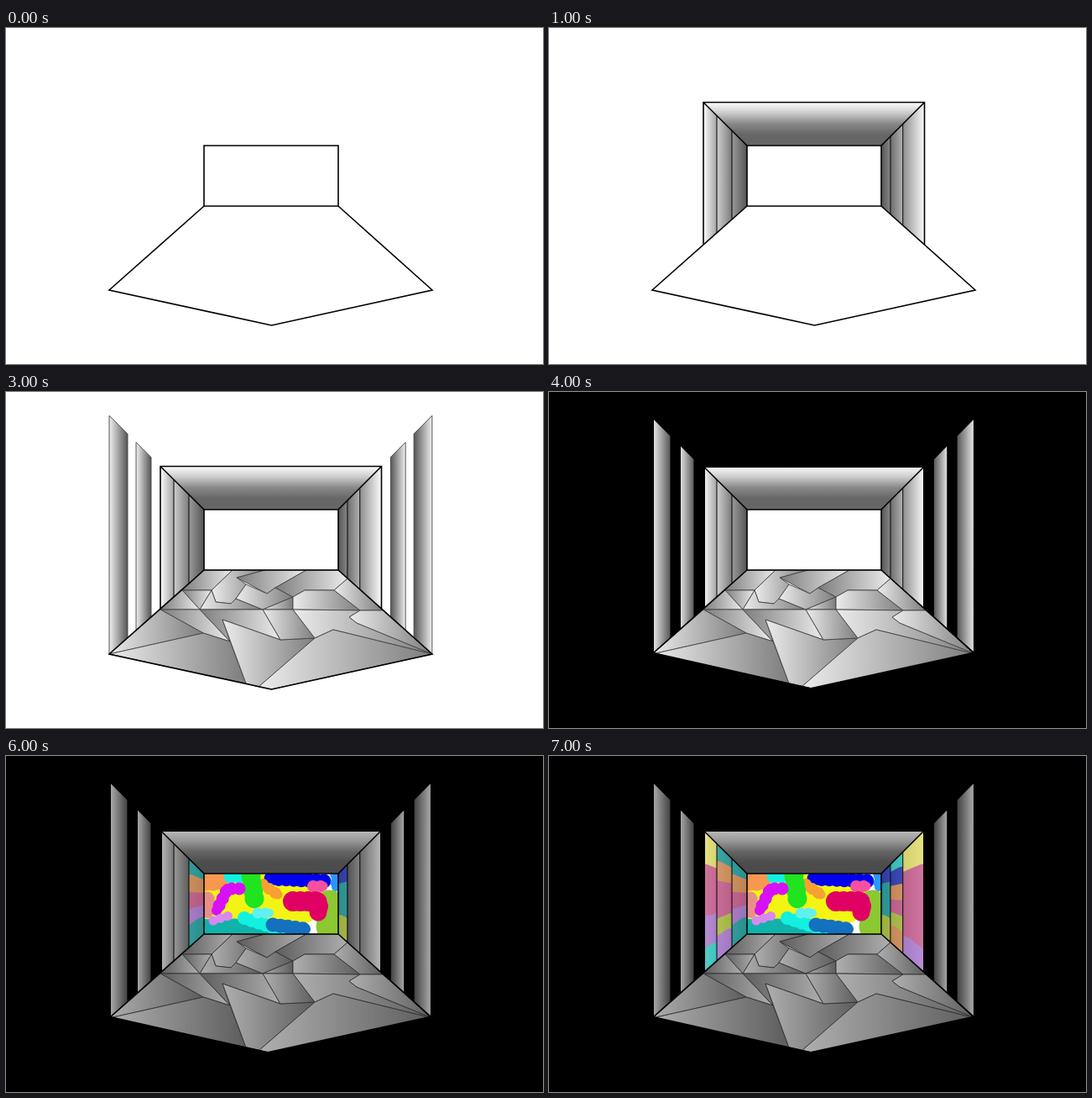
An HTML page for the animation above (8000 ms loop, 640x400 px).

```html
<!DOCTYPE html>
<html lang="en">
<head>
<meta charset="utf-8">
<title>Stage room</title>
<style>
html, body { margin: 0; width: 100%; height: 100%; overflow: hidden; background: #fff; }
svg { display: block; width: 100vw; height: 100vh; }
.step { animation: 8s step-end infinite; }
.ink { fill: none; stroke: #000; stroke-width: 1.6; }
.thin { stroke-width: 1; }
#floor, #columns { stroke: #444; stroke-width: .9; stroke-linejoin: round; }
.paint { fill: none; stroke-linecap: round; stroke-linejoin: round; }
.side { opacity: .75; }
</style>
</head>
<body>
<svg viewBox="0 0 640 400" preserveAspectRatio="none">
  <defs id="defs">
    <clipPath id="backClip"><path d="M236 140H396V212H236z"/></clipPath>
  </defs>
  <g id="floor" class="step" data-from="2"></g>
  <g id="walls" class="step" data-from="1"></g>
  <g id="columns" class="step" data-from="3"></g>
  <path class="step" data-from="5" fill-opacity=".26" fill-rule="evenodd" d="M0 0H640V400H0zM236 140V212H396V140z"/>
  <g id="mural" class="step paint" data-from="6" clip-path="url(#backClip)"></g>
  <g id="inner" class="step paint side" data-from="6"></g>
  <g id="outer" class="step paint side" data-from="7"></g>
  <g id="edges" class="step ink" data-from="1">
    <path d="M184 258V88.500H447.500V258M184 88.500L236 140M447.500 88.500L396 140"/>
  </g>
  <path class="ink" d="M236 140H396V212H236zM236 212L123 312L316.500 354L508 312L396 212"/>
  <path id="night" class="step" data-from="4" fill-rule="evenodd"/>
</svg>
<script>
const $ = id => document.getElementById(id);
let count = 0;

function add(parent, tag, attrs) {
  const el = document.createElementNS('http://www.w3.org/2000/svg', tag);
  for (const k in attrs) el.setAttribute(k, attrs[k]);
  return parent.appendChild(el);
}

// Each layer appears at its own second of the loop.
const style = document.head.appendChild(document.createElement('style'));
for (const el of document.querySelectorAll('.step')) {
  const s = el.dataset.from;
  el.style.animationName = 'from' + s;
  style.textContent += `@keyframes from${s} { 0% { visibility: hidden }
    ${s * 12.5}%, 100% { visibility: visible } }`;
}

// Polygon with an even gradient, left to right or downwards.
function poly(layer, points, colors, down) {
  const id = 'g' + count++;
  const grad = add($('defs'), 'linearGradient', { id, x2: down ? 0 : 1, y2: down ? 1 : 0 });
  colors.forEach((c, i) => add(grad, 'stop', { offset: i / (colors.length - 1), 'stop-color': c }));
  add($(layer), 'polygon', { points, fill: `url(#${id})` });
}

// Room in perspective: d is the distance outwards from the back wall.
const LEFT = -1, RIGHT = 1;
const xAt = (side, d) => side < 0 ? 236 - d : 396 + d * .99;
const topAt = d => 140 - d * .99;
const footAt = d => 212 + d * .885;
const grey = v => `rgb(${v},${v},${v})`;

const slab = (side, d0, d1, drop = 0) => [
  [xAt(side, d0), topAt(d0) + drop], [xAt(side, d1), topAt(d1) + drop],
  [xAt(side, d1), footAt(d1) - drop / 3], [xAt(side, d0), footAt(d0) - drop / 3]
];

function shadeSlab(layer, side, d0, d1, dark, light) {
  const tones = [grey(light), grey(dark)];
  poly(layer, slab(side, d0, d1).join(' '), side < 0 ? tones : tones.reverse());
}

// Floor corners by letter; each tile lists its corners and where its light falls.
const corner = {};
for (const c of `a236,212 b270,212 c309,212 d358,212 e396,212 f210,236 g245,236 h268,252
  i250,250 j274,246 k286,229 l275,221 m311,240 n321,233 o342,244 p356,236 q391,236 r407,222
  s184,259 t231,259 u306,259 v342,259 w422,260 x449,260 y235,287 z267,297 A258,271 B327,295
  C368,293 D390,283 E409,268 F418,275 G123,312 H286,347 I301,351 J316,354 K508,312`.split(/\s+/))
  corner[c[0]] = c.slice(1);

for (const tile of `<abgf <fgt <fts >bclkjhig >gihjut <cdnml >kmnouj >uov <derqpon >opqwv
  >rqwx <stzy >syG >GyzH <tuBAz >ABCIH >uvCB >vwEFKDC >wxKFE >ICDKJ`.split(/\s+/)) {
  const tones = [grey(236), grey(125)];
  if (tile[0] === '<') tones.reverse();
  poly('floor', [...tile.slice(1)].map(k => corner[k]).join(' '), tones);
}

poly('walls', '184,88 447,88 396,140 236,140', ['#fff', '#ccc', '#888', '#666', '#666'], true);

// Painted panel: bands of colour from top to bottom, clipped to the slab.
function paintPanel(layer, side, d0, d1, colors) {
  const id = 'c' + count++;
  add(add($('defs'), 'clipPath', { id }), 'polygon', { points: slab(side, d0, d1).join(' ') });
  const g = add($(layer), 'g', { 'clip-path': `url(#${id})` });
  const x0 = xAt(side, d0), x1 = xAt(side, d1), n = colors.length;
  const y = (d, i) => topAt(d) + (footAt(d) - topAt(d)) * (i + .5) / n;
  const width = (footAt(d1) - topAt(d1)) / n + 5;
  colors.forEach((c, i) => add(g, 'path', {
    d: `M${x0} ${y(d0, i)}L${x1} ${y(d1, i)}`, stroke: c, 'stroke-width': width
  }));
}

const yellow = '#f4f070', cyan = '#30d8d0', pink = '#d86098', lilac = '#b880e0',
  teal = '#20a8a8', orange = '#e89858', lime = '#b8d040', blue = '#2838c0';

const panels = [
  [LEFT, [0, 18, 36, 52], [[teal, orange, pink, lilac, teal],
    [teal, orange, pink, pink, lime, lilac], [yellow, yellow, pink, pink, pink, lilac, lilac, cyan]]],
  [RIGHT, [0, 11, 26, 52], [[blue, teal, teal, lime],
    [cyan, blue, orange, pink, lime, orange], [yellow, yellow, pink, pink, pink, pink, pink, lilac]]]
];
for (const [side, depth, bands] of panels)
  bands.forEach((colors, i) => {
    const d0 = depth[i], d1 = depth[i + 1];
    shadeSlab('walls', side, d0, d1, 84 + d0 * 2.2, 105 + d1 * 2.8);
    paintPanel(i ? 'outer' : 'inner', side, d0, d1, colors);
    if (i) add($('edges'), 'path', { class: 'thin', d: `M${xAt(side, d0)} ${topAt(d0)}V${footAt(d0)}` });
  });

// Columns, and the darkness that leaves room and columns free.
let night = 'M0 0H640V400H0zM186 90H446V256L504 310L312 352L125 310L186 256z';
for (const side of [LEFT, RIGHT])
  for (const [d0, d1] of [[63, 81], [91, 113]]) {
    shadeSlab('columns', side, d0, d1, 85, 240);
    night += 'M' + slab(side, d0 + .5, d1 - 2, 3).join('L') + 'z';
  }
$('night').setAttribute('d', night);

// Cloud of paint: a solid path with a chain of larger dots for a scalloped edge.
function cloud(color, width, path) {
  const d = 'M' + path;
  add($('mural'), 'path', { d, stroke: color, 'stroke-width': width });
  add($('mural'), 'path', { d, stroke: color, 'stroke-width': width + 3, 'stroke-dasharray': '0 9' });
}
cloud('#f4f414', 60, '260 170H350');
cloud('#12b2aa', 22, '236 206H320');
cloud('#8cc832', 30, '386 176V206');
cloud('#f89850', 22, '238 148H254');
cloud('#e89088', 14, '240 170V186');
cloud('#12f0e0', 14, '268 143H290');
cloud('#0000ee', 14, '316 146L380 149');
cloud('#2898ff', 10, '393 142V156');
cloud('#f8a030', 11, '306 153L324 165');
cloud('#f850a0', 11, '366 155H378');
cloud('#e00064', 21, '342 173H372V186');
cloud('#20e420', 20, '292 143L296 170');
cloud('#d810f8', 12, '278 158H264L251 184');
cloud('#d888f0', 8, '247 196L266 190');
cloud('#12f0e0', 13, '284 193L330 208');
cloud('#60f0f0', 10, '300 187H314');
cloud('#1470c0', 14, '318 201L356 206');
</script>
</body>
</html>
```
